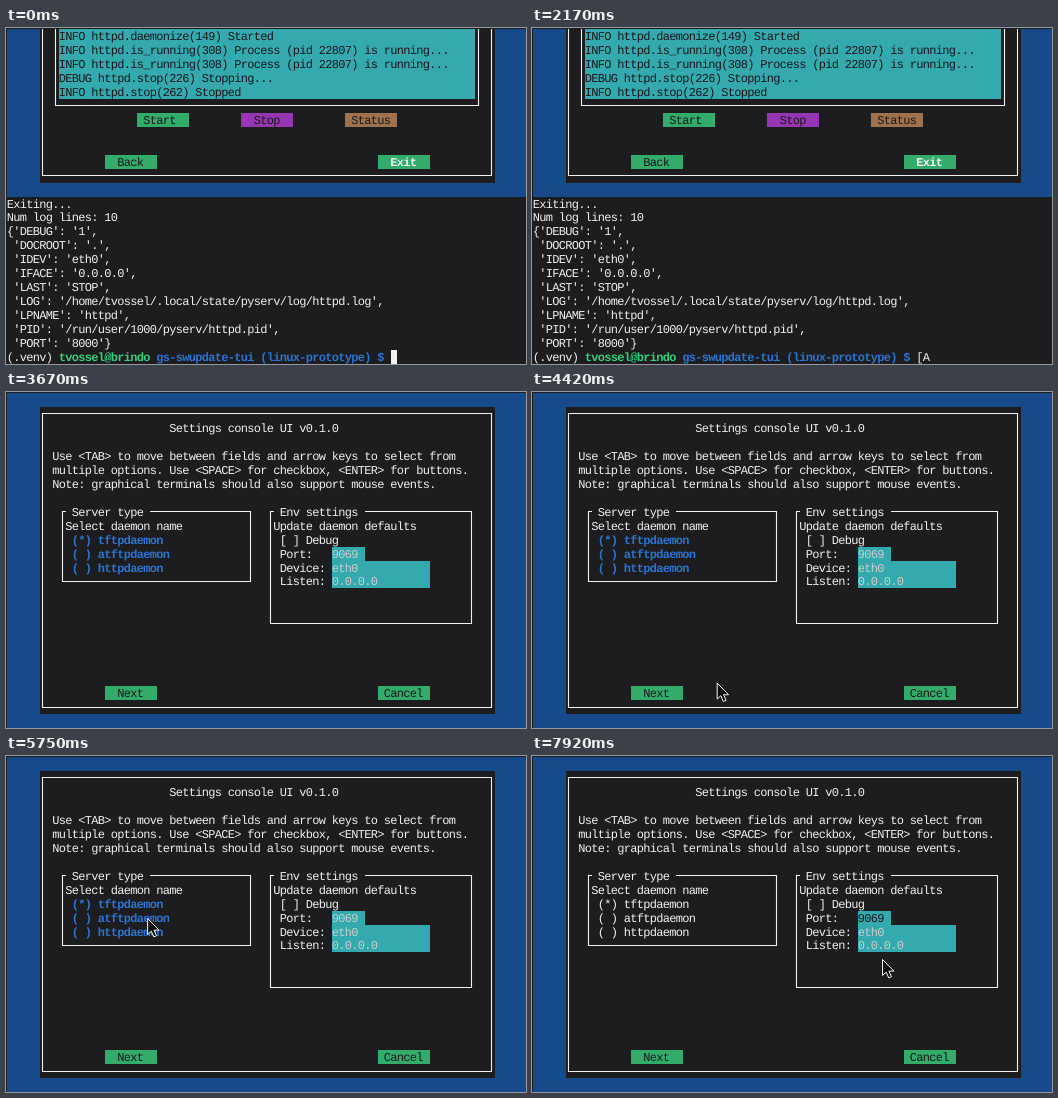
Write an HTML page that moves like this. It is 520 px wide and 336 px high and loops after 8 s.

```html
<!DOCTYPE html>
<html lang="en">
<head>
<meta charset="utf-8">
<title>Terminal session</title>
<style>
  html, body { margin: 0; width: 100%; height: 100%; overflow: hidden; background: #1d1d20; }
  svg { display: block; width: 100vw; height: 100vh; }
  text {
    font: 12px "Liberation Mono", monospace; letter-spacing: -0.7px;
    white-space: pre; text-rendering: geometricPrecision;
  }
  .bold { font-weight: bold; }
</style>
</head>
<body>
<svg id="stage" viewBox="0 0 520 336"></svg>
<script>
const NS = 'http://www.w3.org/2000/svg';
const LOOP = 8000, TICK = 1000 / 12;
const CW = 6.5, CH = 13.96;
const C = {
  bg: '#1d1d20', fg: '#f0f0f0', black: '#19191c', blue: '#164a8a', cyan: '#34a9ae',
  green: '#33ab6b', purple: '#9636b2', brown: '#a0714d', grey: '#c6cfcc',
  brightGreen: '#33d17a', brightBlue: '#2b74d0'
};
const X = col => 1 + col * CW;
const Y = row => 1 + row * CH;
const edgeX = col => Math.round(X(col));
const edgeY = row => Math.round(Y(row));
const midX = col => Math.floor(X(col + 0.5)) + 0.5;
const midY = row => Math.floor(Y(row + 0.5)) + 0.5;

function add(parent, tag, attrs = {}) {
  const el = document.createElementNS(NS, tag);
  for (const k in attrs) el.setAttribute(k, attrs[k]);
  return parent.appendChild(el);
}

function cells(parent, col, row, cols, rows, fill) {
  const x = edgeX(col), y = edgeY(row);
  return add(parent, 'rect', {
    x, y, width: edgeX(col + cols) - x, height: edgeY(row + rows) - y, fill
  });
}

function print(parent, col, row, str, fill = C.fg, bold = false) {
  const el = add(parent, 'text', { x: X(col) - 0.2, y: edgeY(row) + 11, fill });
  if (bold) el.setAttribute('class', 'bold');
  el.textContent = str;
  return el;
}

function stroke(parent, d) {
  add(parent, 'path', { d, fill: 'none', stroke: C.fg, 'stroke-width': 1.1 });
}

// Frame through the cell centres, with an optional title in the top edge
function frame(parent, c0, r0, c1, r1, title) {
  const l = midX(c0), t = midY(r0), r = midX(c1), b = midY(r1);
  if (!title) return stroke(parent, `M${l} ${t}H${r}V${b}H${l}Z`);
  const end = edgeX(c0 + 3 + title.length);
  stroke(parent, `M${edgeX(c0 + 1)} ${t}H${l}V${b}H${r}V${t}H${end}`);
  print(parent, c0 + 2, r0, title);
}

function button(parent, col, row, label, fill, pad, ink = C.black, bold = false) {
  cells(parent, col, row, 8, 1, fill);
  print(parent, col + pad, row, label, ink, bold);
}

const svg = document.getElementById('stage');
add(svg, 'rect', { width: 520, height: 336, fill: C.bg });

// Shell view
const shell = add(svg, 'g');
cells(shell, 0, 0, 80, 12, C.blue);
cells(shell, 5, -2, 70, 13, C.bg);
cells(shell, 8, 0, 64, 5, C.cyan);
[
  'INFO httpd.daemonize(149) Started',
  'INFO httpd.is_running(308) Process (pid 22807) is running...',
  'INFO httpd.is_running(308) Process (pid 22807) is running...',
  'DEBUG httpd.stop(226) Stopping...',
  'INFO httpd.stop(262) Stopped'
].forEach((line, i) => print(shell, 8, i, line, C.black));
frame(shell, 7, -2, 72, 5);
frame(shell, 5, -2, 74, 10);
button(shell, 20, 6, 'Start', C.green, 1);
button(shell, 36, 6, 'Stop', C.purple, 2);
button(shell, 52, 6, 'Status', C.brown, 1);
button(shell, 15, 9, 'Back', C.green, 2);
button(shell, 57, 9, 'Exit', C.green, 2, C.fg, true);
[
  'Exiting...',
  'Num log lines: 10',
  "{'DEBUG': '1',",
  " 'DOCROOT': '.',",
  " 'IDEV': 'eth0',",
  " 'IFACE': '0.0.0.0',",
  " 'LAST': 'STOP',",
  " 'LOG': '/home/tvossel/.local/state/pyserv/log/httpd.log',",
  " 'LPNAME': 'httpd',",
  " 'PID': '/run/user/1000/pyserv/httpd.pid',",
  " 'PORT': '8000'}"
].forEach((line, i) => print(shell, 0, 12 + i, line));
print(shell, 0, 23, '(.venv)');
print(shell, 8, 23, 'tvossel@brindo', C.brightGreen, true);
print(shell, 23, 23, 'gs-swupdate-tui (linux-prototype) $', C.brightBlue, true);
const input = print(shell, 59, 23, '');
const wrapped = print(shell, 0, 24, '');
const caret = cells(shell, 59, 23, 1, 1, C.fg);

// Settings dialog
const dialog = add(svg, 'g');
cells(dialog, 0, 0, 80, 24, C.blue);
cells(dialog, 5, 1, 70, 22, C.bg);
frame(dialog, 5, 1, 74, 22);
print(dialog, 25, 2, 'Settings console UI v0.1.0');
[
  'Use <TAB> to move between fields and arrow keys to select from',
  'multiple options. Use <SPACE> for checkbox, <ENTER> for buttons.',
  'Note: graphical terminals should also support mouse events.'
].forEach((line, i) => print(dialog, 7, 4 + i, line));

frame(dialog, 8, 8, 37, 13, 'Server type');
print(dialog, 9, 9, 'Select daemon name');
const radios = ['(*) tftpdaemon', '( ) atftpdaemon', '( ) httpdaemon']
  .map((label, i) => print(dialog, 10, 10 + i, label));

frame(dialog, 40, 8, 71, 16, 'Env settings');
print(dialog, 41, 9, 'Update daemon defaults');
print(dialog, 42, 10, '[ ] Debug');
const [port] = [['Port:', '9069', 5], ['Device:', 'eth0', 15], ['Listen:', '0.0.0.0', 15]]
  .map(([label, value, width], i) => {
    print(dialog, 42, 11 + i, label);
    cells(dialog, 50, 11 + i, width, 1, C.cyan);
    return print(dialog, 50, 11 + i, value, C.grey);
  });
button(dialog, 15, 21, 'Next', C.green, 2);
button(dialog, 57, 21, 'Cancel', C.green, 1);

add(svg, 'rect', { width: 520, height: 1, fill: C.bg });
const pointer = add(svg, 'path', {
  d: 'M0 0V16L3.7 12.6L6.2 18.4L8.9 17.2L6.4 11.6H11.4Z',
  fill: '#0c0c0e', stroke: '#f4f4f4', 'stroke-width': 1
});

// Shell steps: time, typed text, wrapped text, scrolled rows, caret column, caret row, caret shown
const COMMAND = 'python scripts/daemon';
const STEPS = [
  [0, '', '', 0, 59, 23, true],
  [500, '', '', 0, 59, 23, false],
  [1080, '', '', 0, 59, 23, true],
  [1580, '[A', '', 0, 61, 23, true],
  [2160, '[A', '', 0, 61, 23, false],
  [2580, '[', '', 0, 60, 23, true],
  [2660, '', '', 0, 59, 23, true],
  [3160, COMMAND, 'tui.py', 1, 7, 24, true],
  [3500, COMMAND, 'tui.py', 2, 0, 25, true]
];
const DIALOG_AT = 3660, POINTER_AT = 4250, CLICK_AT = 6750;

// Pointer path: time, x, y
const PATH = [
  [4250, 215, 330], [4750, 100, 180], [5080, 88, 147], [5250, 88, 147],
  [5900, 150, 165], [6160, 150, 165], [6560, 350, 162.5], [7080, 350, 162.5],
  [7580, 350.5, 203.5], [8000, 350.5, 203.5]
];

function pointerAt(t) {
  const i = Math.max(1, PATH.findIndex(p => p[0] >= t));
  const [t0, x0, y0] = PATH[i - 1], [t1, x1, y1] = PATH[i];
  const k = Math.min(1, Math.max(0, (t - t0) / (t1 - t0)));
  const e = k * k * (3 - 2 * k);
  return [x0 + (x1 - x0) * e, y0 + (y1 - y0) * e];
}

const show = (el, on) => el.setAttribute('visibility', on ? 'visible' : 'hidden');

function render(time) {
  const t = Math.floor((time % LOOP + 5) / TICK) * TICK % LOOP;
  const inDialog = t >= DIALOG_AT;
  shell.style.display = inDialog ? 'none' : '';
  dialog.style.display = inDialog ? '' : 'none';
  show(pointer, t >= POINTER_AT - 5);

  if (!inDialog) {
    const [, typed, rest, scroll, col, row, on] = STEPS.filter(s => s[0] <= t + 4).pop();
    input.textContent = typed;
    wrapped.textContent = rest;
    shell.setAttribute('transform', `translate(0 ${-Math.round(scroll * CH)})`);
    caret.setAttribute('x', edgeX(col));
    caret.setAttribute('y', edgeY(row));
    show(caret, on);
    return;
  }
  const clicked = t >= CLICK_AT - 5;
  radios.forEach(el => {
    el.setAttribute('fill', clicked ? C.fg : C.brightBlue);
    el.setAttribute('class', clicked ? '' : 'bold');
  });
  port.setAttribute('fill', clicked ? C.black : C.grey);
  const [x, y] = pointerAt(t);
  pointer.setAttribute('transform', `translate(${x} ${y})`);
}

const start = performance.now();
(function loop() {
  render(performance.now() - start);
  requestAnimationFrame(loop);
})();
</script>
</body>
</html>
```
